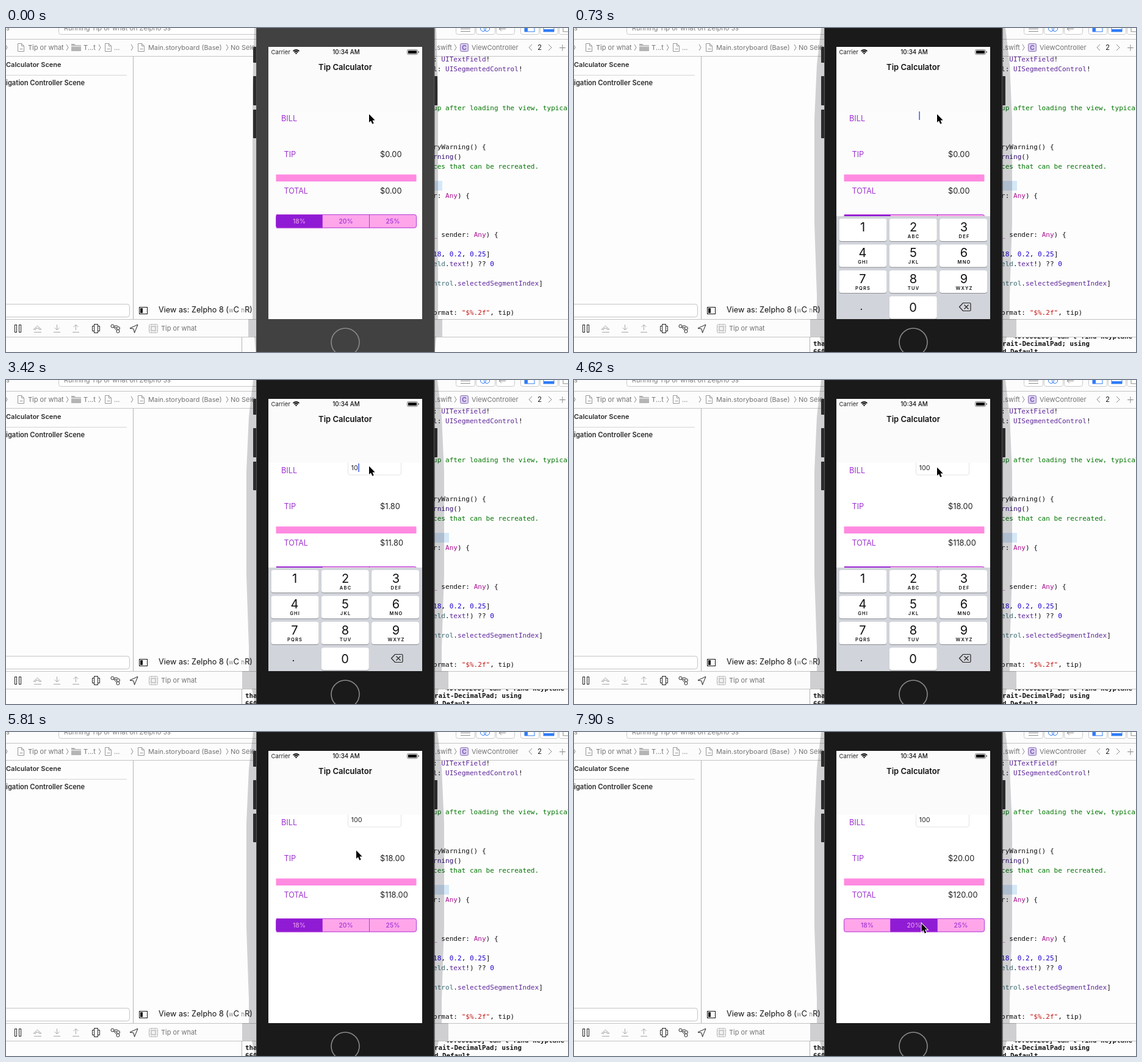
These frames come from a looping animation (921x532 px, 8000 ms). An HTML page:

```html
<!DOCTYPE html>
<html>
<head>
<meta charset="utf-8">
<style>
html, body { margin: 0; width: 100%; height: 100%; overflow: hidden; background: #fdfdfd }
svg { display: block; width: 921px; height: 532px; font-family: Inter, Roboto, sans-serif }
text { white-space: pre }
.mono { font-family: "DejaVu Sans Mono", monospace }
.line { fill: none; stroke: #8a8a8a }
</style>
</head>
<body>
<svg id="stage" viewBox="0 0 921 532"></svg>
<script>
const LOOP = 8000;
const stage = document.getElementById('stage');
const $ = id => document.getElementById(id);

const rect = (x, y, w, h, fill, more = '') =>
  `<rect x="${x}" y="${y}" width="${w}" height="${h}" fill="${fill}" ${more}/>`;
const path = (d, stroke = '#8a8a8a', more = '') =>
  `<path d="${d}" fill="none" stroke="${stroke}" ${more}/>`;
const text = (x, y, size, str, fill, more = '') =>
  `<text x="${x}" y="${y}" font-size="${size}" fill="${fill}" ${more}>${str}</text>`;
const mid = 'text-anchor="middle" ', bold = 'font-weight="600"';
const chevron = (x, y = 32, d = 3, h = 5) => path(`M${x} ${y - h}l${d} ${h}l${-d} ${h}`);

// Code lines: [baseline, colour, words, colour, words...]
const ink = '#111', type = '#5c2699', green = '#007400', pink = '#aa0d91', blue = '#1c00cf';
const code = [
  [55, ink, ': ', type, 'UITextField', ink, '!'],
  [71, ink, 'l: ', type, 'UISegmentedControl', ink, '!'],
  [135, green, 'up after loading the view, typically'],
  [199, ink, 'ryWarning() {'],
  [215, '#2e0d6e', 'rning', ink, '()'],
  [231, green, 'ces that can be recreated.'],
  [279, ink, 'r: ', pink, 'Any', ink, ') {'],
  [343, pink, '_', ink, ' sender: ', pink, 'Any', ink, ') {'],
  [375, blue, '18', ink, ', ', blue, '0.2', ink, ', ', blue, '0.25', ink, ']'],
  [391, '#3f6e74', 'eld', ink, '.', type, 'text', ink, '!) ?? ', blue, '0'],
  [423, '#3f6e74', 'ntrol', ink, '.', type, 'selectedSegmentIndex', ink, ']'],
  [471, ink, 'ormat: ', '#c41a16', '"$%.2f"', ink, ', tip)']
];
const codeLine = ([y, ...runs]) => {
  let spans = '';
  for (let i = 0; i < runs.length; i += 2) spans += `<tspan fill="${runs[i]}">${runs[i + 1]}</tspan>`;
  return text(700, y, 11.07, spans, ink, 'class="mono"');
};

const toolbar = () => {
  const boxes = [[737, 31], [770, 31], [803, 30], [843, 30], [875, 29], [906, 29]]
    .map(([x, w]) => rect(x + .5, -14.5, w, 25, '#fff', 'stroke="#c8c8c8" rx="3"')).join('');
  return rect(0, 0, 921, 47, '#fcfcfc') +
    rect(86.5, -14.5, 420, 25, '#fff', 'stroke="#c8c8c8" rx="3"') +
    text(95, 3.5, 11, 'Running Tip or what on Zelpho 5s', '#808080') + text(0, 3.5, 11, 's', '#808080') +
    boxes + path('M745 1.5h16M745 5.5h16') +
    path('M808 1.5h11M812 -2l-4 3.5l4 3.5') +
    '<g class="line" style="stroke:#2f7cf6"><circle cx="782" cy="1" r="4.5"/><circle cx="788" cy="1" r="4.5"/></g>' +
    rect(850, -6, 16, 12, 'none', 'stroke="#2f7cf6"') + rect(850, -6, 5, 12, '#2f7cf6') +
    rect(881, -6, 17, 12, 'none', 'stroke="#2f7cf6"') + rect(881, 2, 17, 4, '#2f7cf6') +
    rect(913, -6, 16, 12, 'none', 'stroke="#8a8a8a"') +
    path('M0 18.5H921M0 46.5H921', '#c4c4c4');
};

const page = x => path(`M${x} 25.5h6l4 4v9h-10zM${x + 6} 25.5v4h4M${x + 3} 34.5h5`, '#999');
const pathBar = () => {
  const g = '#747474';
  return page(19.5) + page(162.5) + page(216.5) +
    '<path d="M107 26h5l2 2h9v10h-16z" fill="#b5b5b5"/><path d="M107 30h16" stroke="#fff"/>' +
    [-1, 99, 152, 205, 361, 735].map(x => chevron(x)).join('') +
    text(36, 36, 11, 'Tip or what', g) + text(127, 36, 11, 'T...t', g) + text(177, 36, 11, '...', g) +
    text(233, 36, 10.9, 'Main.storyboard (Base)', g) + text(368, 36, 11, 'No Selection', g) +
    text(703, 36, 11, '.swift', g) +
    rect(744.5, 25.5, 13, 13, '#d9cdee', 'stroke="#8d78b8" rx="2"') +
    text(751, 36, 10, 'C', '#6b4fa5', mid + bold) +
    text(763, 36, 11, 'ViewController', g) +
    chevron(862, 32, -5) + text(871, 36, 11.5, '2', '#222') + chevron(889, 32, 5) +
    path('M907 32.5h10M912 27.5v10');
};

const panels = () =>
  text(0, 64, 11, 'Calculator Scene', '#2b2b2b', bold) +
  text(0, 94, 11.1, 'igation Controller Scene', '#2b2b2b', bold) +
  path('M0 77.5H198', '#d4d4d4') + path('M208.5 47V478', '#b4b4b4') +
  rect(-10, 453.5, 212.5, 21, '#fff', 'stroke="#c4c4c4" rx="4"') +
  rect(218.5, 458.5, 13, 11, '#fff', 'stroke="#111"') + rect(220, 460, 4, 8, '#111') +
  text(250, 467, 12.7, 'View as: Zelpho 8 (<tspan font-size="9.5" fill="#888">w</tspan>C ' +
    '<tspan font-size="9.5" fill="#888">h</tspan>R)', '#111');

const debugBar = () => {
  const k = '#222', g = '#a8a8a8';
  return rect(0, 478, 921, 30, '#fcfcfc') + path('M0 478.5H921M0 507.5H921', '#c4c4c4') +
    path('M386.5 508V532', '#b4b4b4') +
    rect(14.5, 487.5, 3, 12, '#fff', `stroke="${k}"`) + rect(21.5, 487.5, 3, 12, '#fff', `stroke="${k}"`) +
    path('M45 495l6.5-6l6.5 6h-4v-2h-5v2zM46 499.5h12', g) +
    path('M83.5 487v8M79.5 492l4 4l4 -4M78 499.5h11', g) +
    path('M114.5 496v-8M110.5 491l4 -4l4 4M109 499.5h11', g) +
    rect(144.5, 486.5, 6, 14, '#fff', `stroke="${k}"`) +
    path('M144 489.5h-2.5v8h2.5M151 489.5h2.5v8h-2.5', k) +
    path('M176 490l7 3.5M176 491l6 6M178 489h5', k) +
    [[174.5, 489.5], [184, 493], [183.5, 498]].map(([x, y]) =>
      `<circle cx="${x}" cy="${y}" r="2.5" fill="#fff" stroke="${k}"/>`).join('') +
    path('M203 493l13 -6l-5.5 13.5l-1.5 -6.5z', k) +
    rect(234.5, 486.5, 14, 14, '#f3f3f3', 'stroke="#bbb" rx="2"') +
    path('M238.5 487v13M244.5 487v13M235 490.5h13M235 496.5h13', '#ccc') +
    '<circle cx="241.5" cy="493.5" r="4" class="line" style="stroke:#bbb"/>' +
    text(254, 497, 11, 'Tip or what', '#747474');
};

const consoleText = () => {
  const put = (x, y, s, more = '') => text(x, y, 10.8, s, ink, `class="mono" font-weight="700" ${more}`);
  return '<clipPath id="out"><path d="M387 508H921V532H387z"/></clipPath><g id="log" clip-path="url(#out)">' +
    put(915, 509.5, "40:660288] Can't find keyplane", 'text-anchor="end"') +
    put(392, 522, 'tha') + put(702, 522, 'rait-DecimalPad; using') +
    put(392, 535, '660') + put(702, 535, 'd_Default') + '</g>';
};

const phone = () =>
  '<path id="shade" fill="#000014" fill-opacity=".18"/>' +
  [[405, 31, 26], [405, 79, 48], [405, 134, 47], [701, 79, 48]]
    .map(([x, y, h]) => rect(x, y, 6, h, '#2c2c2c', 'rx="1"')).join('') +
  rect(410, -5, 292.5, 545, '#1a1a1a', 'id="body"') +
  path('M410.5 0V532M701.5 0V532', '#555') +
  '<circle cx="556" cy="516" r="23" class="line" stroke-width="1.6"/>' +
  rect(430, 31, 252, 447, '#fbfbfb');

const status = () =>
  text(434.5, 43, 9.6, 'Carrier', '#222') + text(557.5, 43, 9.8, '10:34 AM', '#111', mid + 'font-weight="500"') +
  path('M470.5 38q5 -4 10 0M472.5 40q3 -2.5 6 0', '#111', 'stroke-width="1.7"') +
  '<path d="M473.7 41.3q1.8 -1.2 3.6 0l-1.8 2z" fill="#111"/>' +
  rect(657.5, 35.5, 17, 8, 'none', 'stroke="#777" rx="2"') + rect(659, 37, 14, 5, '#000') +
  rect(675.5, 38, 1.5, 3, '#777') +
  text(556, 68.5, 13, 'Tip Calculator', '#111', mid + bold);

const purple = '#a033d2', edges = [443, 519, 596, 672.5];
const form = () =>
  rect(430, 136, 252, 342, '#fff', 'id="paper"') +
  '<clipPath id="below"><path d="M430 136H682V478H430z"/></clipPath>' +
  `<g clip-path="url(#below)">${rect(560.5, 126.5, 87, 29.5, '#fff', 'id="field" stroke="#e3e3e3" rx="4"')}</g>` +
  text(565.5, 148, 10.8, '', '#222', 'id="bill"') + rect(0, 137, 1.6, 14, '#4763ea', 'id="caret"') +
  text(451, 152.5, 12.7, 'BILL', purple) + text(455.5, 211.5, 12.7, 'TIP', purple) +
  text(455.5, 271.5, 12.4, 'TOTAL', purple) +
  text(613, 211.5, 12.8, '', '#222', 'id="tip"') + text(613, 271.5, 12.8, '', '#222', 'id="total"') +
  rect(442.5, 240.5, 230, 11.5, '#ff8be0') +
  rect(442.5, 306, 230, 22.5, '#ffa6eb', 'rx="3"') + rect(0, 306, 0, 22.5, '#8f1bd4', 'id="pick"') +
  path('M518.5 306v22M595.5 306v22', '#b13ad6') +
  rect(442.5, 306.5, 230, 21.5, 'none', 'rx="3" stroke="#b13ad6"') +
  ['18%', '20%', '25%'].map((s, i) =>
    text([480.5, 557, 634][i], 321, 10.3, s, purple, `${mid} font-weight="500" class="seg"`)).join('');

const keyboard = () => {
  const letters = ['', 'ABC', 'DEF', 'GHI', 'JKL', 'MNO', 'PQRS', 'TUV', 'WXYZ'];
  const cap = (col, y) => {
    const x = 434.5 + col * 82.3;
    return rect(x, y + 1, 78, 37, '#8b8d92', 'rx="4"') + rect(x, y, 78, 37, '#fff', 'rx="4"');
  };
  const keys = letters.map((s, i) => {
    const col = i % 3, y = 312 + 42.5 * Math.floor(i / 3), x = 473 + 83 * col;
    return cap(col, y) + text(x, y + 20.5, 20, i + 1, '#111', mid) +
      text(x + .6, y + 31.5, 7.5, s, '#111', `${mid} ${bold} letter-spacing="1.2"`);
  }).join('');
  return `<g clip-path="url(#below)"><g id="keys">${rect(430, 308, 252, 175, '#d1d4da')}${keys}` +
    cap(1, 439.5) + text(555.5, 464.5, 20, '0', '#111', mid) + text(471, 462, 17, '.', '#111', mid) +
    path('M631.5 457l6 -6.5h11q1.5 0 1.5 1.5v10q0 1.5 -1.5 1.5h-11zM639.5 453.5l7 7M646.5 453.5l-7 7', '#222', 'stroke-width="1.2"') +
    '</g></g>';
};

stage.innerHTML = rect(0, 0, 921, 532, '#fdfdfd') + toolbar() + pathBar() + panels() +
  rect(700, 251, 0, 16, '#d4e8f8', 'id="glow"') + code.map(codeLine).join('') + debugBar() +
  phone().replace('/>', '/>' + consoleText()) + status() + form() + keyboard() +
  '<path id="mouse" d="M0 0V13.5L3 10.8L5.3 16L7.7 15L5.5 10H9.7Z" fill="#000" stroke="#fff" stroke-width="2" paint-order="stroke"/>';

// Phone shadow: left outline, mirrored about the centre line
const outline = pts => {
  const right = pts.map(([x, y]) => [1112 - x, y]).reverse();
  return 'M' + [...pts, ...right].join('L') + 'z';
};
const idle = outline([[407, 0], [404, 100], [404, 478], [397, 478], [397, 507], [407, 507], [409, 532]]);
const active = outline([[405, 0], [398, 60], [394, 150], [394, 320], [398, 440], [398, 478],
  [387, 478], [387, 507], [403, 507], [408, 532]]);

// Held steps: [start, value...]
const keySteps = [[0, 175], [440, 38], [590, 6], [730, 1], [880, 0], [5220, 60], [5370, 145], [5520, 168], [5660, 175]];
const caretSteps = [[0, 0], [440, 1], [880, .5], [1030, 0], [1330, .5], [1480, 1], [1930, .5], [2080, 0],
  [2380, .5], [2530, 1], [2970, .5], [3120, 1], [4170, .5], [4320, 0]];
const billSteps = [[0, ''], [3120, '1'], [3420, '10'], [3720, '100']];
const mouseSteps = [[0, 595, 141.5], [4620, 595, 143.5], [4770, 575.5, 188], [5220, 574, 194.5], [5960, 567, 225],
  [6110, 556, 268], [6260, 546, 303], [6410, 546, 313], [6710, 548.5, 314.5], [7760, 558, 315], [7900, 569.5, 314.5]];
const at = (steps, t) => steps.findLast(s => s[0] <= t).slice(1);
const set = (id, attrs) => { for (const k in attrs) $(id).setAttribute(k, attrs[k]); };

function draw(t) {
  const on = t >= 140, settled = t >= 880, choice = t >= 6860 ? 1 : 0;
  set('body', { fill: on ? '#1a1a1a' : '#414141' });
  set('shade', { d: on ? active : idle });
  set('glow', { width: on ? 26 : 15 });
  set('log', { opacity: t >= 440 ? 1 : 0 });
  set('paper', { fill: settled ? '#fff' : '#fcfcfc' });
  set('field', { opacity: settled ? 1 : 0 });

  const [bill] = at(billSteps, t), tip = bill * [.18, .2][choice];
  $('bill').textContent = bill;
  $('tip').textContent = '$' + tip.toFixed(2);
  $('total').textContent = '$' + (+bill + tip).toFixed(2);
  set('caret', { x: 565.3 + [0, 5.5, 12, 18][bill.length], opacity: at(caretSteps, t)[0] });

  set('pick', { x: edges[choice], width: edges[choice + 1] - edges[choice] });
  document.querySelectorAll('.seg').forEach((s, i) => s.setAttribute('fill', i === choice ? '#e79bea' : purple));
  set('keys', { transform: `translate(0 ${at(keySteps, t)[0]})` });
  set('mouse', { transform: `translate(${at(mouseSteps, t)})` });
}

const start = performance.now();
function tick() {
  draw((performance.now() - start) % LOOP);
  requestAnimationFrame(tick);
}
tick();
</script>
</body>
</html>
```
